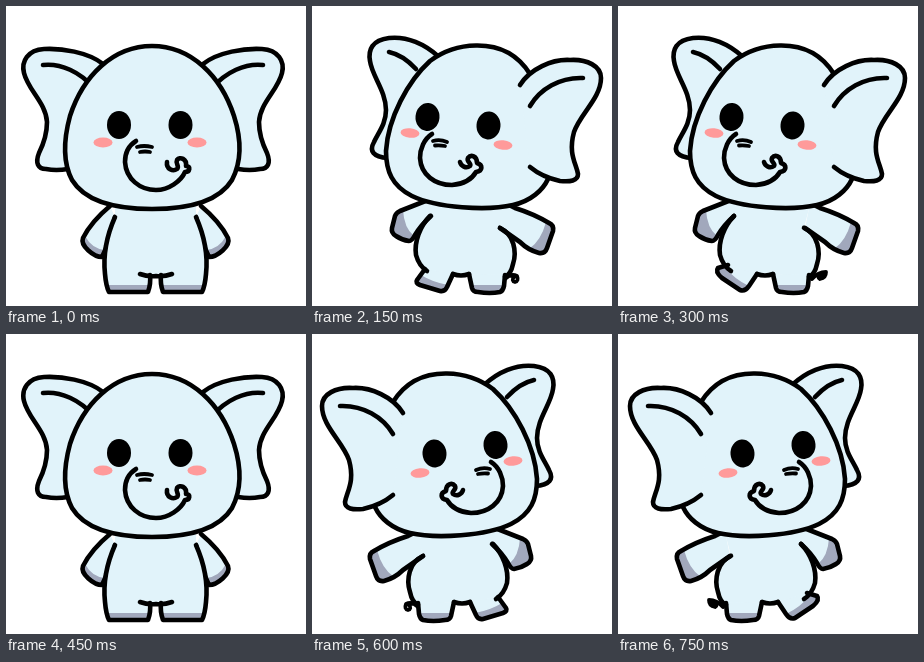
An HTML page for the animation above (900 ms loop, 300 by 300 pixels).

```html
<!DOCTYPE html>
<html lang="en">
<head>
<meta charset="utf-8">
<title>Dancing elephant</title>
<style>
  html, body { margin: 0; width: 100%; height: 100%; overflow: hidden; background: #fff; }
  svg { display: block; width: 100vw; height: 100vh; }
  .line { fill: none; stroke: #000; stroke-width: 4.6; stroke-linecap: round; stroke-linejoin: round; }
  .thin { stroke-width: 3.8; }
  .skin { fill: #e1f3fa; }
  .shade { fill: #a1a8bc; }
  .cheek { fill: #ff9a9a; }
</style>
</head>
<body>
<svg id="stage" viewBox="0 0 300 300"></svg>
<script>
const path = (kind, d) => `<path class="${kind}" d="${d}"/>`;
const line = d => path('line', d);
const thin = d => path('line thin', d);
const part = (outline, shade = '') =>
  path('skin', outline) + path('shade', shade) + line(outline);
const ellipse = (x, y, rx, ry, kind = '', tilt = 0) =>
  `<ellipse class="${kind}" cx="${x}" cy="${y}" rx="${rx}" ry="${ry}" transform="rotate(${tilt} ${x} ${y})"/>`;
const move = (x, y, content) => `<g transform="translate(${x} ${y})">${content}</g>`;
const mirror = (width, content) => `<g transform="matrix(-1 0 0 1 ${width} 0)">${content}</g>`;

function frontPose() {
  const ear =
    part('M97 58C82 46 55 42 38 43C22 44 15 55 18 67C22 84 40 97 41 116C41 130 37 139 33 147C29 157 32 163 40 163Q50 165 62 163L100 110') +
    line('M37 59C55 57 74 66 88 82');
  const arm = part(
    'M104 200C92 210 82 222 77 232C74 240 88 251 96 251L101 240L109 211',
    'M77 232C74 240 88 251 96 251L99 244Q86 243 79 230Z');
  const side = line('M109 211C101 229 97 250 99 268Q100 280 103 286H142Q145 278 144 269');
  const sole = path('shade', 'M101 279H144L142 286H103Z');
  const half = arm +
    path('skin', 'M109 195V211C101 229 97 250 99 268Q100 280 103 286H142L144 269L151 270V195Z') +
    sole + side;
  return half + mirror(299, half) +
    line('M134 268Q142 271 150 270Q158 271 166 268') +
    ear + mirror(294, ear) +
    part('M146 40C185 40 215 70 228 110C235 132 236 155 226 174C212 197 180 203 146 203C112 203 80 197 66 174C56 155 58 132 64 110C77 70 107 40 146 40Z') +
    ellipse(97, 136.5, 9.5, 5, 'cheek') + ellipse(191, 136.5, 9.5, 5, 'cheek') +
    ellipse(113, 119, 12, 14) + ellipse(174.5, 119, 12, 14) +
    line('M130 135C122 140 119 148 119 156C120 173 134 184 150 184C163 184 175 175 179 166C184 166 185 160 180 160C181 153 174 150 171 154C169 158 174 160 171 163C167 166 160 163 161 156') +
    thin('M131 141Q138 139 146 141M134 146Q139 145 144 146');
}

function turnedHead() {
  return part('M127 51C113 38 95 30 77 32C60 34 56 44 58 55C60 70 74 85 74 104C74 118 66 127 62 136C57 145 61 151 76 152L110 100') +
    line('M77 46Q91 49 104 63') +
    part('M164 39.5C192 39 208 52 218 68C234 95 244 150 236 173C231 184 219 195 201 199C175 205 125 202 100 190C80 180 74 165 74 145C76 112 96 75 118 55Q138 40 164 39.5Z') +
    part('M208 79C218 63 240 53 258 54C275 53 289 60 289 72C289 92 268 108 262 126C256 148 264 157 266 168C266 175 258 176 248 175Q230 171 218 161') +
    line('M218 100C228 83 248 71 271 72') +
    ellipse(98, 127, 9.5, 4.7, 'cheek', 5) + ellipse(191, 139, 9.5, 4.7, 'cheek', 5) +
    ellipse(115.5, 111, 12, 14, '', 5) + ellipse(176.5, 119.5, 12, 14, '', 5) +
    line('M120 128C112 133 108 143 108 152C109 169 123 179 140 179C152 178 160 173 164 166C171 165 171 159 165 157C165 150 159 148 156 152C154 156 160 157 158 160C154 163 149 160 148 156') +
    thin('M121 135Q128 133 135 136M123 139.5Q128 139 133 140');
}

function turnedPose(kicking) {
  const tail = kicking
    ? thin('M196 273Q202 266 210 266Q210 272 204 273Q200 271 207 268')
    : thin('M193 273Q199 267 205 270Q207 275 203 276Q199 275 202 271');
  const foot = kicking
    ? part('M112 259L102 262Q99 266 106 272L124 284Q129 286 133 280L141 268',
           'M102 262Q99 266 106 272L124 284Q129 286 133 280Q118 273 109 261Z')
    : part('M113 263L105 274Q103 277 108 279L128 285Q133 286 135 281L141 268',
           'M105 274Q103 277 108 279L128 285Q133 286 136 279Q120 276 109 269Z');
  const torso = path('skin', 'M113 195L118 210C108 220 102 236 104 249Q107 260 115 265L141 268Q149 271 157 268L193 271Q199 268 201 258C205 246 202 228 188 222L195 195Z');
  const arms =
    move(kicking ? -1 : 0, 0, part(
      'M116 194L88 205Q84 207 83 210L80 222Q79 227 84 230Q90 234 97 235Q100 235 103 229Q109 219 119 210',
      'M88 205Q84 207 83 210L80 222Q79 227 84 230Q90 234 97 235Q100 235 102 230Q92 222 91 204Z')) +
    move(kicking ? 1 : 0, 0, part(
      'M193 197L203 202Q222 208 237 217Q242 219 241 225L235 242Q233 248 227 247Q216 244 208 236L188 222',
      'M237 217Q242 219 241 225L235 242Q233 248 227 247L217 243Q229 235 234 216Z'));
  return move(kicking ? -2 : 0, 0, tail + torso + foot +
    part('M157 268L160 282Q161 286 166 286Q178 288 188 286Q191 285 192 280L193 269',
         'M159 279L160 282Q161 286 166 286Q178 288 188 286Q191 285 192 279Z') +
    arms +
    line('M118 210C108 220 102 236 104 249Q107 260 115 265M188 222C202 228 205 246 201 258Q199 268 193 271M141 268Q149 271 157 268') +
    turnedHead());
}

const front = frontPose(), step = turnedPose(false), kick = turnedPose(true);
const poses = [front, step, kick, front, mirror(299, step), mirror(299, kick)];
const poseTime = 150;

const stage = document.getElementById('stage');
stage.innerHTML = poses.map(pose => `<g>${pose}</g>`).join('');
const layers = [...stage.children];

function draw(now) {
  const current = Math.floor(now / poseTime) % poses.length;
  layers.forEach((layer, i) => layer.style.display = i === current ? '' : 'none');
  requestAnimationFrame(draw);
}
draw(performance.now());
</script>
</body>
</html>
```
